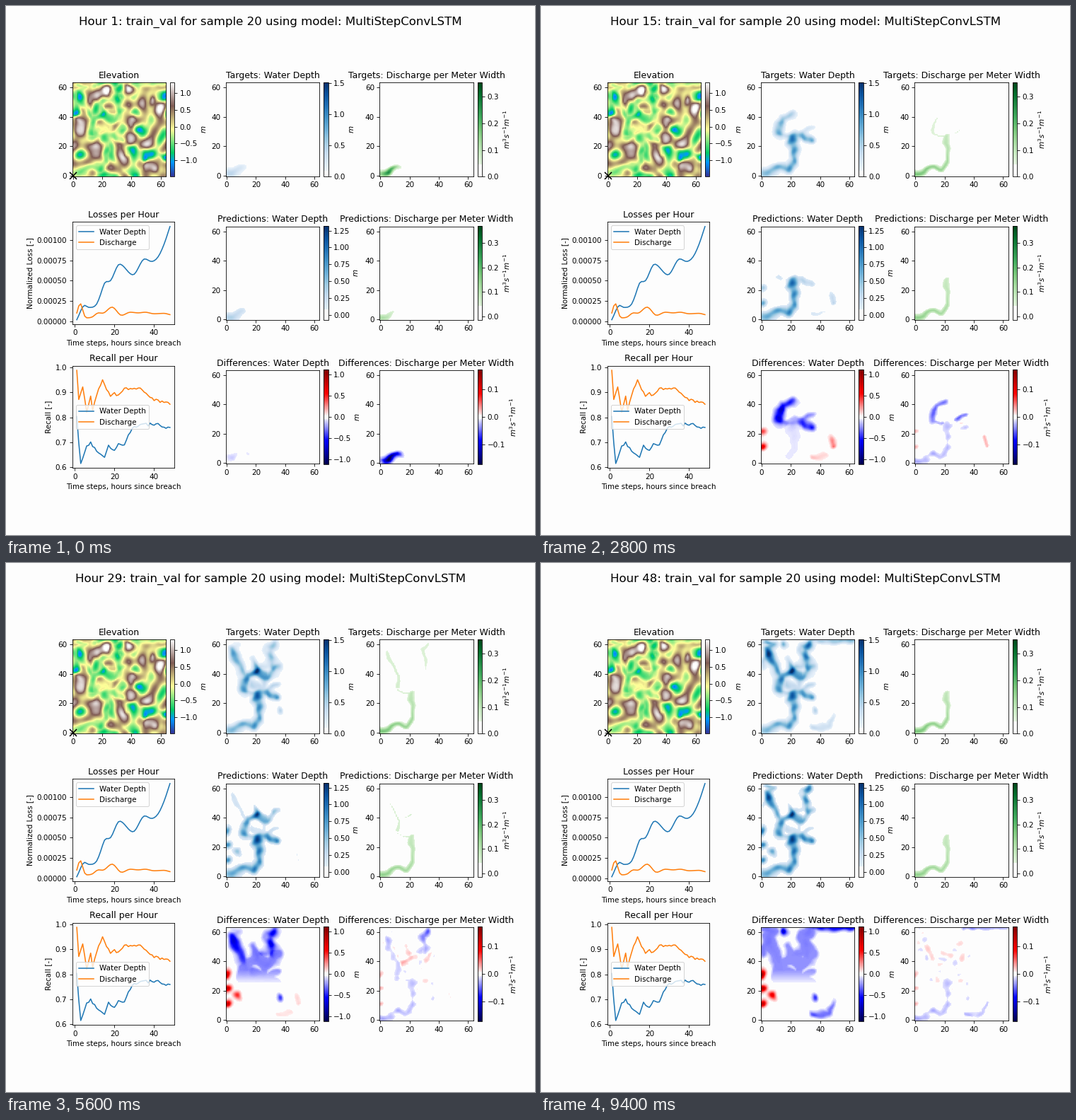
A matplotlib script that plays this animation: 748x748 px, repeating every 9.6 s.

```python
import numpy as np
import matplotlib.pyplot as plt
from matplotlib.animation import FuncAnimation
from matplotlib.colors import ListedColormap

N, HOURS, PAPER = 64, 48, "#fdfdfd"
Y, X = np.mgrid[0:N, 0:N].astype(float)


# ---------- helpers ----------
def noise(seed, wavelength):
    """Smooth band-limited noise with unit deviation."""
    freq = np.hypot(*np.meshgrid(np.fft.fftfreq(N), np.fft.fftfreq(N)))
    ring = np.exp(-((freq * wavelength - 1) / 0.35) ** 2)
    white = np.random.default_rng(seed).normal(size=(N, N))
    out = np.fft.ifft2(np.fft.fft2(white) * ring).real
    return out / out.std()


def fade(t, end, tau):
    return np.exp(-np.maximum(t - end, 0) / tau)


def smooth(points):
    """Hourly values of a cubic through key points, flat at turning points."""
    x, y = np.array(points, float).T
    d = np.diff(y) / np.diff(x)
    m = np.concatenate([d[:1], (d[:-1] + d[1:]) / 2 * (d[:-1] * d[1:] > 0), d[-1:]])
    t = np.arange(1, HOURS + 1)
    i = np.clip(np.searchsorted(x, t, "right") - 1, 0, len(d) - 1)
    h = x[i + 1] - x[i]
    s = (t - x[i]) / h
    return (y[i] + (y[i + 1] - y[i]) * s * s * (3 - 2 * s)
            + h * s * (1 - s) * (m[i] * (1 - s) - m[i + 1] * s))


def jagged(points, seed):
    x, y = np.array(points, float).T
    jitter = np.random.default_rng(seed).normal(0, .003, HOURS)
    return np.interp(np.arange(1, HOURS + 1), x, y) + jitter


# Slightly warped coordinates keep the water's edge irregular.
WX, WY = X + .5 * noise(1, 11), Y + .5 * noise(2, 11)
RIPPLE = 1 + .12 * noise(4, 8)
GRAIN = noise(9, 8)


class Branch:
    """Water advancing along key points; each place starts filling when the front arrives."""

    def __init__(self, points, depth, start, speed=6, tau=3, radius=2.6,
                 flux=(.065, .065), hold=99, drain=99):
        p = np.array(points, float)
        arc = np.concatenate([[0], np.cumsum(np.hypot(*np.diff(p, axis=0).T))])
        self.arc = np.linspace(0, arc[-1], int(arc[-1]) + 1)
        along = self.arc / max(arc[-1], 1)
        x, y = (np.interp(self.arc, arc, c)[:, None, None] for c in p.T)
        self.shape = np.exp(-((WX - x) ** 2 + (WY - y) ** 2) / radius ** 2)
        self.core = self.shape ** 2.6
        self.deep = depth[0] + (depth[1] - depth[0]) * along
        self.flow = flux[0] + (flux[1] - flux[0]) * along
        self.arrival = start + self.arc / speed
        self.tau, self.hold, self.drain = tau, hold, drain

    def rise(self, t, tau):
        return 1 - np.exp(-np.maximum(t - self.arrival, 0) / tau)

    def depth(self, t):
        amp = self.deep * self.rise(t, self.tau) * fade(t, self.arrival + self.drain, 4)
        return (amp[:, None, None] * self.shape).max(0)

    def flux(self, t, surge=0.0):
        amp = self.flow * self.rise(t, 2) * fade(t, self.arrival + self.hold, 4)
        amp = amp * (1 + surge * np.clip(self.arc / 6, 0, 1))
        return (amp[:, None, None] * self.core).max(0)


def spot(x, y, depth, start, **kw):
    return Branch([(x, y)], (depth, depth), start, **kw)


# ---------- where the water goes ----------
channel = Branch([(0, 1), (8, 4), (13, 5.5), (18, 4.5), (22, 10), (22.5, 18), (20.5, 22), (22, 27)],
                 (.6, 1.1), -3, 4, 3.5, 3.0, flux=(.18, .1))
basins = [
    Branch([(22, 27), (17, 27), (12, 28)], (.6, .5), 8, 7, radius=2.3, hold=24),
    Branch([(12, 28), (12, 35), (15, 39), (21, 41)], (.85, 1.15), 9, 4, radius=2.8, hold=11),
    Branch([(22, 27), (28, 28), (33, 24)], (.6, 1), 8, 12, radius=2.5, hold=4),
    Branch([(28, 29), (34, 32)], (.4, .45), 11.5, radius=2.1, hold=5),
    Branch([(21, 41), (27, 38), (32, 41), (34, 44)], (1.1, .7), 15, radius=2.8, flux=(.03, .03), hold=5),
    Branch([(21, 41), (19, 46), (18, 50)], (1, .35), 16, 3, radius=2.4, flux=(.03, .03), hold=5),
    Branch([(26, 38), (25, 30), (17, 33)], (.4, .4), 16, radius=2.6, flux=(.01, .01)),
]
late = [
    Branch([(12, 31), (12, 39), (8, 47), (4.5, 55)], (.6, 1.35), 18, 8, 8, 3.0, flux=(.075, .065), hold=15),
    Branch([(4.5, 54), (8, 60), (3, 62)], (1.1, .7), 26, 5, 8, flux=(.02, .02)),
    Branch([(4, 52), (1, 46)], (.7, .4), 29, tau=8, flux=(.01, .01)),
    Branch([(32, 43), (31, 51), (28, 57), (33, 60)], (.7, 1.1), 21, 6, 8, 3.0, hold=7),
    Branch([(21, 43), (27, 47), (31, 51)], (.6, .6), 21, 6, 8, flux=(.03, .03), hold=7),
]
missed = [
    Branch([(34, 62), (63, 63)], (.5, .9), 34, 8, 7, 2.2, flux=(.04, .03)),
    Branch([(34, 4), (46, 4), (49, 13)], (.35, .4), 33, 2, 4, 1.9, flux=(.02, .02)),
    spot(36, 15, .5, 20, radius=2, flux=(.01, .01)),
    spot(15, 60, .7, 37, radius=2.4, flux=(.01, .01)),
]
leaks = [spot(0, 11 + 10 * k, .85, 3 + 7 * k, tau=8, radius=2.6, flux=(.03, .03)) for k in range(3)] + [
    spot(7, 17, .85, 19, tau=8, radius=2.5, flux=(0, 0)),
    Branch([(49, 13), (47, 17)], (.55, .2), 8, tau=5, radius=2, flux=(.03, .03), drain=15, hold=15),
    Branch([(34, 4), (44, 5)], (.16, .14), 7, tau=5, radius=1.6, flux=(0, 0), drain=18),
    Branch([(0, 1), (4, 2), (11, 5)], (.5, .25), -2, 9, 1, flux=(.2, .07), drain=2, hold=2),
]


def blend(layers):
    return np.cbrt(sum(layer ** 3 for layer in layers)) * RIPPLE


def true_depth(t):
    return blend([b.depth(t) for b in [channel] + basins + late + missed])


# The model spreads later and falls short by a fixed depth away from the breach.
SHORTFALL = .24 * np.clip((Y - 24) / 10, .15, 1)
LAG = 4.8


def model_depth(t):
    body = blend([channel.depth(t - 1.5)] + [b.depth(t - LAG) for b in basins + late])
    return np.maximum(np.maximum(body - SHORTFALL, 0), blend([b.depth(t) for b in leaks]))


def true_flux(t):
    surge = 1.3 * np.exp(-(t - 1) / 1.5)
    return np.max([channel.flux(t, surge)] + [b.flux(t) for b in basins + late + missed], axis=0)


def model_flux(t):
    flows = [.85 * channel.flux(t - .7)] + [.82 * b.flux(t - LAG) for b in basins + late]
    return np.max(flows + [b.flux(t) for b in leaks], axis=0)


def elevation():
    """Random hills with a few summits and pits, cut by the beds the water fills."""
    bed = true_depth(HOURS)
    z = .15 + .5 * noise(20, 13) * (1 - .75 * np.clip(2 * bed, 0, 1)) - .7 * bed
    summits = [(5, 37), (5, 31), (41, 38), (39, 26), (55, 6), (55, 51), (16, 55), (16, 20)]
    pits = [(49, 14), (45, 32), (63, 13), (61, 54)]
    for sign, places in ((1, summits), (-1, pits)):
        for x, y in places:
            near = np.exp(-((WX - x) ** 2 + (WY - y) ** 2) / 16)
            z += (sign * 1.15 - z) * near
    return np.clip(z, -1.47, 1.31)


# ---------- figure ----------
def blank(name, lo, hi):
    """Colour map whose entries between lo and hi show as paper."""
    colors = plt.get_cmap(name)(np.linspace(0, 1, 256))
    colors[int(lo * 255):int(hi * 255) + 1, :3] = int(PAPER[1:3], 16) / 255
    return ListedColormap(colors)


def panel(ax, title, cmap, lo, hi, unit):
    im = ax.imshow(np.zeros((N, N)), origin="lower", cmap=cmap, vmin=lo, vmax=hi)
    ax.set_title(title)
    fig.colorbar(im, ax=ax, fraction=.046, pad=.04).set_label(unit)
    return im


def chart(ax, title, ylabel, depth, discharge, loc):
    hours = np.arange(1, HOURS + 1)
    ax.plot(hours, depth, label="Water Depth")
    ax.plot(hours, discharge, label="Discharge")
    ax.set(title=title, xlabel="Time steps, hours since breach", ylabel=ylabel)
    ax.set_box_aspect(1)
    ax.legend(loc=loc)


fig, axes = plt.subplots(3, 3, figsize=(10, 10), dpi=74.8, facecolor=PAPER)
fig.subplots_adjust(left=.125, right=.9, bottom=.11, top=.88, wspace=.5, hspace=.2)
for ax in axes.flat:
    ax.set_facecolor(PAPER)
heading = fig.suptitle("", fontsize=16)

M, Q = "$m$", "$m^3s^{-1}m^{-1}$"
panel(axes[0, 0], "Elevation", "terrain", -1.48, 1.32, M).set_data(elevation())
axes[0, 0].plot(0, 0, "kx", ms=10, mew=1.5, clip_on=False, zorder=5)

views = [
    panel(axes[0, 1], "Targets: Water Depth", blank("Blues", 0, .06), 0, 1.515, M),
    panel(axes[0, 2], "Targets: Discharge per Meter Width", blank("Greens", 0, .125), 0, .355, Q),
    panel(axes[1, 1], "Predictions: Water Depth", blank("Blues", 0, .115), -.076, 1.318, M),
    panel(axes[1, 2], "Predictions: Discharge per Meter Width", blank("Greens", 0, .155), -.016, .369, Q),
    panel(axes[2, 1], "Differences: Water Depth", blank("seismic", .485, .515), -1.115, 1.115, M),
    panel(axes[2, 2], "Differences: Discharge per Meter Width", blank("seismic", .48, .52), -.1727, .1727, Q),
]

chart(axes[1, 0], "Losses per Hour", "Normalized Loss [-]",
      1e-4 * smooth([(1, .17), (5, 1.95), (7, 1.7), (11, 2.1), (13, 3.3), (15, 4.7), (18, 5), (22.6, 7.05),
                     (29.3, 5.73), (35.3, 7.7), (38.7, 7.38), (42, 7.95), (45, 9.5), (48, 11.7)]),
      1e-4 * smooth([(1, 1), (2.7, 2.2), (5, .62), (8, .45), (12, 1.02), (14, .98), (18.8, 1.73),
                     (23.6, .72), (28, 1.1), (32, 1.02), (35.5, 1.1), (40, .91), (45, .96), (48, .8)]),
      "upper left")
chart(axes[2, 0], "Recall per Hour", "Recall [-]",
      jagged([(1, .797), (3, .614), (6, .686), (8, .702), (10, .669), (15, .643), (17, .687), (19.5, .663),
              (22, .69), (25, .69), (29, .757), (35, .774), (42, .773), (46, .756), (48, .757)], 3),
      jagged([(1, .99), (2, .875), (4, .92), (6, .82), (8, .887), (9, .825), (12, .917), (14, .945),
              (18, .887), (20, .9), (21.5, .883), (25, .915), (33, .917), (40, .87), (48, .858)], 5),
      "center left")


def draw(i):
    t = i + 1
    depth, guess = true_depth(t), model_depth(t)
    q, q_guess = true_flux(t), model_flux(t)
    wet = np.clip(depth * 3, 0, 1)
    fields = (depth, q, guess, q_guess, guess - depth, q_guess - q + .006 * GRAIN * wet)
    for view, field in zip(views, fields):
        view.set_data(field)
    heading.set_text(f"Hour {t}: train_val for sample 20 using model: MultiStepConvLSTM")
    return views + [heading]


anim = FuncAnimation(fig, draw, frames=HOURS, interval=200, repeat=True, repeat_delay=0, blit=False)
plt.show()
```
